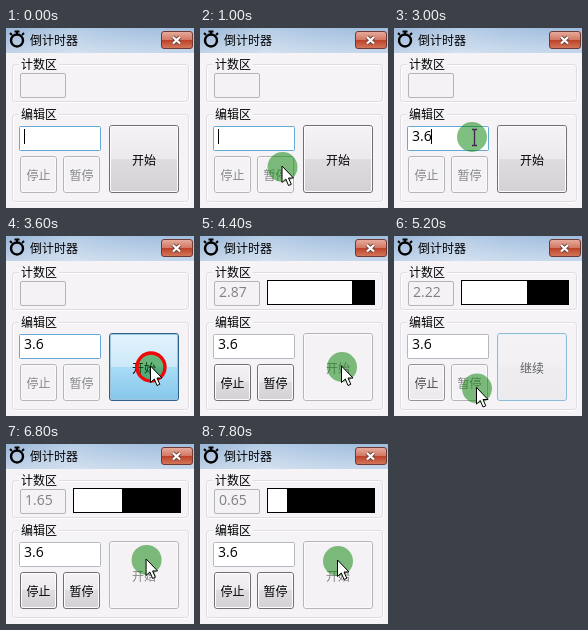
Animation of 188 by 180 pixels, one loop 8 s. Source, as an HTML page:

```html
<!DOCTYPE html>
<html lang="zh-CN">
<head>
<meta charset="utf-8">
<title>倒计时器</title>
<style>
html, body { margin: 0; width: 100%; height: 100%; overflow: hidden; background: #f5f3f6; }
svg { display: block; width: 100%; height: 100%; }
text { font: 12px "Noto Sans CJK SC", "Noto Sans CJK", sans-serif; fill: #000; }
.mid { text-anchor: middle; }
.num { font: 14px "Open Sans", "Noto Sans", sans-serif; }
.group { fill: none; stroke: #dedce0; }
</style>
</head>
<body>
<svg id="stage" viewBox="0 0 188 180"></svg>
<script>
const LOOP = 8000, STEP = 200, TOTAL = 3.6;
const PAUSED = 5200, RESUMED = 6400;
const stage = document.getElementById('stage');

function add(tag, attrs, parent = stage, text) {
  const el = document.createElementNS('http://www.w3.org/2000/svg', tag);
  set(el, attrs);
  if (text) el.textContent = text;
  parent.appendChild(el);
  return el;
}
function set(el, attrs) {
  for (const k in attrs) el.setAttribute(k, attrs[k]);
}
function show(el, on) { el.setAttribute('visibility', on ? 'visible' : 'hidden'); }

const defs = add('defs', {});
function gradient(id, colors, offsets, across) {
  const g = add('linearGradient', { id, x2: across ? 1 : 0, y2: across ? 0 : 1 }, defs);
  colors.forEach((c, i) => add('stop', { offset: offsets[i], 'stop-color': c }, g));
}
const glass = [0, 0.5, 0.5, 1];
gradient('bar', ['#9ab6d8', '#b6cde6', '#a9c4e1', '#9fbcdd'], [0, 0.35, 0.6, 1], true);
gradient('shine', ['#fff0', '#fff6'], [0, 1]);
gradient('close', ['#e6ad9f', '#d37763', '#bd3f25', '#d4795c'], glass);
gradient('normal', ['#f5f3f5', '#ebe9ec', '#dfdcdf', '#d4d1d5'], glass);
gradient('hover', ['#eaf6fd', '#d9f0fc', '#bee6fd', '#a7d9f5'], glass);
gradient('pressed', ['#e3f3fc', '#cce8f8', '#aadcf6', '#84c6ea'], glass);
gradient('focus', ['#f1f5f7', '#e9f0f4', '#dde7ed', '#d0dfe7'], glass);
gradient('pale', ['#f4f2f5', '#f2f0f3', '#efedf0', '#eceaed'], glass);

const looks = {
  normal: { fill: 'url(#normal)', line: '#707070', ink: '#000', inner: '#fcfcfc' },
  hover: { fill: 'url(#hover)', line: '#3c7fb1', ink: '#000', inner: '#f6fcff' },
  pressed: { fill: 'url(#pressed)', line: '#2c628b', ink: '#000', inner: '#9dc5da' },
  focus: { fill: 'url(#focus)', line: '#5f9fc6', ink: '#000', inner: '#b5e2f7' },
  waking: { fill: 'url(#pale)', line: '#8dbcd6', ink: '#606060', inner: '#e4f1f8' },
  fading: { fill: 'url(#pale)', line: '#939396', ink: '#484848', inner: '#fafafa' },
  disabled: { fill: '#f4f2f5', line: '#b4b5b8', ink: '#858585', inner: '#fafafa' }
};

function button(x, y, w, h, label, drop = 5) {
  const box = add('rect', { x: x + 0.5, y: y + 0.5, width: w - 1, height: h - 1, rx: 2.5 });
  const inner = add('rect', { x: x + 1.5, y: y + 1.5, width: w - 3, height: h - 3, rx: 1.5, fill: 'none' });
  const text = add('text', { x: x + w / 2, y: y + h / 2 + drop, class: 'mid' }, stage, label);
  return (state, caption = label) => {
    const s = looks[state];
    set(box, { fill: s.fill, stroke: s.line });
    set(inner, { stroke: s.inner });
    text.style.fill = s.ink;
    text.textContent = caption;
  };
}

function group(y, h, title) {
  add('rect', { x: 7.5, y: y + 1.5, width: 176, height: h, rx: 3, class: 'group', style: 'stroke:#fff' });
  add('rect', { x: 6.5, y: y + 0.5, width: 176, height: h, rx: 3, class: 'group' });
  add('rect', { x: 13, y: y - 2, width: 40, height: 6, fill: '#f5f3f6' });
  add('text', { x: 15, y: y + 5 }, stage, title);
}

// Window chrome
add('rect', { width: 188, height: 180, fill: '#f5f3f6' });
for (const id of ['bar', 'shine']) add('rect', { width: 188, height: 25, fill: `url(#${id})` });
add('circle', { cx: 11, cy: 12.5, r: 6, fill: 'none', stroke: '#000', 'stroke-width': 2.4 });
add('path', { d: 'M8.5 3.5h5M11 3v4M4 5l2 2M18 5l-2 2', stroke: '#000', 'stroke-width': 2 });
add('text', { x: 24, y: 17 }, stage, '倒计时器');
add('rect', { x: 155.5, y: 3.5, width: 31, height: 17, rx: 2.5, fill: 'url(#close)', stroke: '#6d3a35' });
for (const [color, width] of [['#70443f', 4], ['#fff', 2.2]]) {
  add('path', { d: 'M167 9l7 6.5M174 9l-7 6.5', stroke: color, 'stroke-width': width });
}
group(36, 37, '计数区');
group(86, 87, '编辑区');

// Counter, progress bar and input
add('rect', { x: 14.5, y: 45.5, width: 45, height: 24, rx: 1.5, fill: '#f4f2f5', stroke: '#b4b5b8' });
const counter = add('text', { x: 19, y: 61, class: 'num', style: 'fill:#808080' });
const progress = add('g', {});
add('rect', { x: 67, y: 44, width: 108, height: 25 }, progress);
const rest = add('rect', { x: 68, y: 45, height: 23, fill: '#fff' }, progress);
const field = add('rect', { x: 13.5, y: 98.5, width: 81, height: 24, rx: 1, fill: '#fff' });
const entry = add('text', { x: 18, y: 113, class: 'num' });
const caret = add('rect', { y: 101, width: 1, height: 15 });

const stop = button(14, 128, 37, 37, '停止');
const pause = button(57, 128, 37, 37, '暂停');
const start = button(103, 97, 70, 68, '开始', 6);

// Pointer with highlight disc
const pointer = add('g', {});
add('circle', { r: 15, fill: '#008000', 'fill-opacity': 0.5 }, pointer);
const ring = add('circle', { r: 14, fill: 'none', stroke: '#f00808', 'stroke-width': 3.4 }, pointer);
const arrow = add('path', {
  d: 'M-.5 -1V15.5L3.3 12 6 18.5 8.8 17.3 6 11H11Z', fill: '#fff', stroke: '#000'
}, pointer);
const beam = add('path', {
  d: 'M0 -7.5h2l.5 .5 .5 -.5h2M2.5 -7V8M0 8.5h2l.5 -.5 .5 .5h2', fill: 'none', stroke: '#40284c', 'stroke-width': 1.3
}, pointer);

// time, x, y
const path = [
  [600, 100, 172], [1400, 65, 106], [2000, 65, 106], [3000, 78, 109],
  [3400, 145, 131], [3600, 145, 131], [3800, 142, 131], [4400, 142, 131],
  [4800, 83, 152.5], [5400, 83, 152.5], [6000, 148, 113], [6400, 148, 113],
  [7000, 138, 117], [8000, 138, 117]
];
function pointerAt(t) {
  const i = Math.max(1, path.findIndex(p => p[0] > t));
  const [t0, x0, y0] = path[i - 1], [t1, x1, y1] = path[i];
  const u = Math.max(0, (t - t0) / (t1 - t0)), e = u * u * (3 - 2 * u);
  return [x0 + (x1 - x0) * e, y0 + (y1 - y0) * e];
}

function remaining(t) {
  if (t < PAUSED) return TOTAL - (t - 3670) / 1000;
  if (t < RESUMED) return 2.22;
  return 2.22 - (t - 6230) / 1000;
}

function startLook(t, x) {
  if (t < 3600) return t >= 3000 && x > 103 ? 'hover' : 'normal';
  if (t < 3800) return 'pressed';
  if (t < PAUSED || t >= RESUMED) return 'disabled';
  if (t === PAUSED) return 'waking';
  if (t >= 6200) return 'pressed';
  return x > 103 ? 'hover' : 'focus';
}

function render(t) {
  const [x, y] = pointerAt(t);
  const paused = t >= PAUSED && t < RESUMED;
  const running = t >= 3800 && !paused;

  const visible = (t >= 600 && t < 2000) || t >= 3000;
  const overField = x > 13 && x < 95 && y > 98 && y < 123;
  set(pointer, { transform: `translate(${x} ${y})`, display: visible ? 'inline' : 'none' });
  show(ring, [1400, 3600, 5000, 6200].includes(t));
  show(arrow, !overField);
  show(beam, overField);

  const value = t < 1800 ? '' : t < 2400 ? '3' : t < 3000 ? '3.' : '3.6';
  entry.textContent = value;
  set(caret, { x: 18 + [0, 7, 11, 19][value.length] });
  show(caret, t < 600 || (t >= 1000 && t < 3400));
  set(field, { stroke: t < 3800 ? '#66a9d7' : '#b5b8be' });

  const left = remaining(t);
  counter.textContent = t >= 3800 ? left.toFixed(2) : '';
  show(progress, t >= 3800);
  show(rest, t >= 3800);
  set(rest, { width: Math.max(0, Math.min(106, Math.floor(106 * left / TOTAL))) });

  const idle = t === PAUSED ? 'fading' : 'disabled';
  const overPause = x > 57 && x < 94 && y > 128;
  stop(running ? 'normal' : idle);
  pause(!running ? 'disabled' : t === 5000 ? 'pressed' : overPause ? 'hover' : 'normal');
  start(startLook(t, x), paused ? '继续' : '开始');
}

function tick() {
  const t = performance.now() % LOOP;
  render(Math.floor(t / STEP) * STEP);
  requestAnimationFrame(tick);
}
tick();
</script>
</body>
</html>
```
